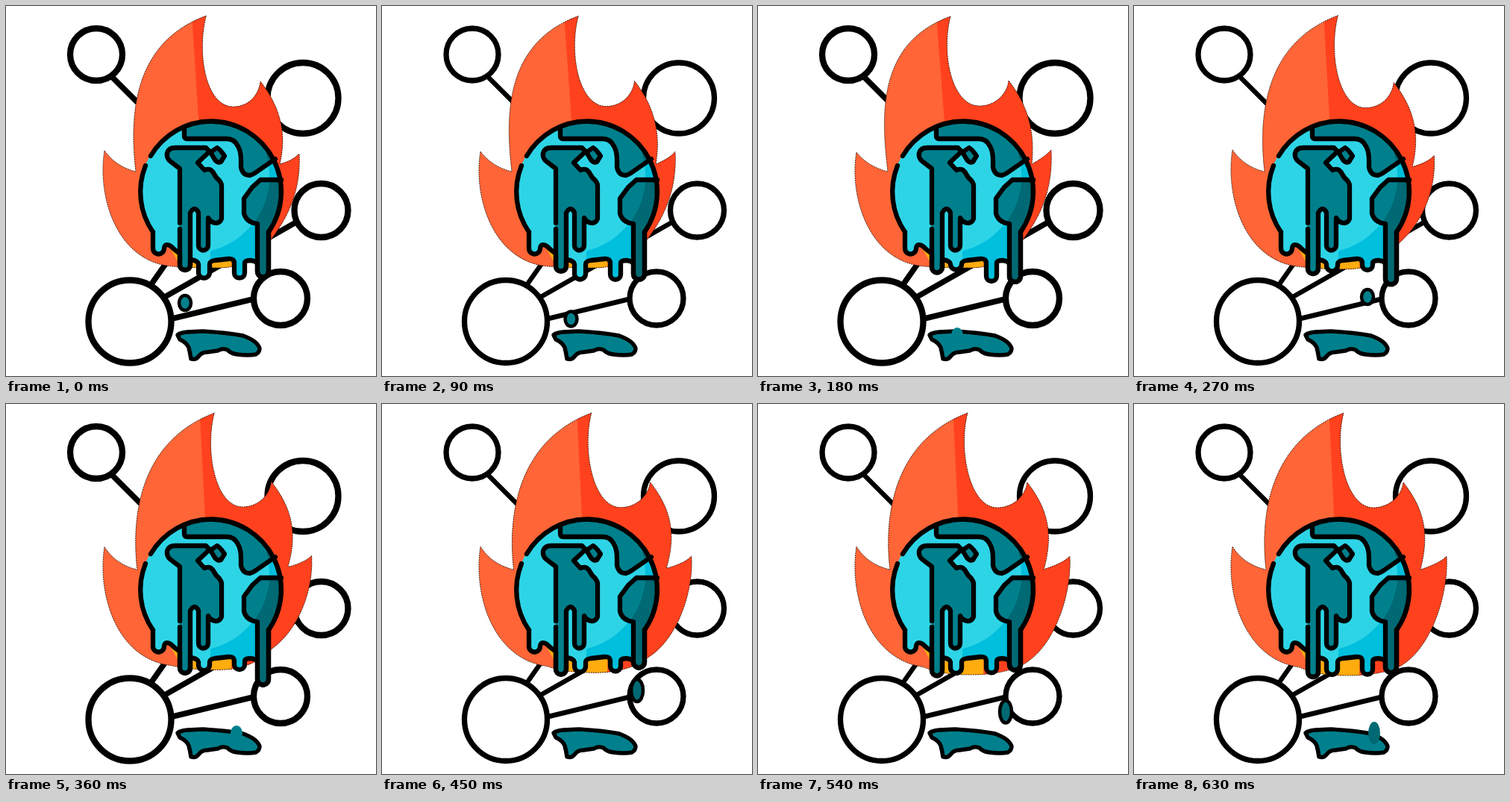
Recreate the animation shown at these times as an HTML page with a canvas. Size 496 by 496 pixels, loop 0.72 s.

```html
<!DOCTYPE html>
<html>
<head>
<meta charset="utf-8">
<title>Melting globe</title>
<style>
html, body { margin: 0; width: 100%; height: 100%; overflow: hidden; background: #fff; }
canvas { display: block; width: 100vw; height: 100vh; }
</style>
</head>
<body>
<canvas id="stage" width="496" height="496"></canvas>
<script>
const ctx = document.getElementById('stage').getContext('2d');
const STEP = 90, COUNT = 8;
const TEAL = '#00808c', DARK_TEAL = '#006973', CYAN = '#2dd4e6', DARK_CYAN = '#00bfdc';

const nodes = [[121, 65, 35], [398, 123.5, 47.5], [422.5, 274, 36], [368, 392, 36], [166, 423, 55.5]];
const links = 'M122 75L200 153M166 414L225 330M190 403L422 271M190 427L360 386';
const puddle = 'M230 441Q233 438 243 437L264 436Q298 438 318 442Q337 449 340 459Q340 464 335 467' +
  'Q325 469 310 467Q301 466 297 461Q290 458 284 462L270 464Q262 464 258 470Q254 475 248 473' +
  'Q247 466 245 458Q242 451 233 447Z';
const north = 'M239 163V174Q239 178 243 178H296Q306 178 311 188Q315 195 315 207V216' +
  'Q317 227 327 227Q331 226 335 223L361 205';
const lozenge = 'M274 196L283 190Q287 192 293 201L288 209Q284 211 280 206Z';
const rim = 'M194 201A94.5 94.5 0 0 1 275 154.5A94.5 94.5 0 0 1 352 303' +
  'M197 303A94.5 94.5 0 0 1 187 214';

// Each long drip lets go at a step, then grows back
const drips = [
  { from: 0, grow: 12 }, { from: 2, grow: 13 }, { from: 3, grow: 15 }, { from: 5, grow: 23 }
];
const drops = [
  { from: 0, steps: 3, x: 240, y: 398, endX: 267, ry: 10, color: TEAL },
  { from: 3, steps: 2, x: 313, y: 390, endX: 309, ry: 10, color: TEAL },
  { from: 5, steps: 3, x: 342, y: 384, endX: 322, ry: 15, color: DARK_TEAL }
];

const lerp = (a, b, t) => a + (b - a) * t;

// Settles back from rest to 0 in two steps, then eases out to 1
function lean(k, power, rest) {
  return k < 2 ? rest * (1 - k / 2) : 1 - (1 - (k - 2) / 5) ** power;
}

function fill(path, color) {
  ctx.fillStyle = color;
  ctx.fill(new Path2D(path));
}

function line(path, width = 6.3) {
  ctx.strokeStyle = '#000';
  ctx.lineWidth = width;
  ctx.stroke(new Path2D(path));
}

function drawNodes(big) {
  line(links, big ? 7.5 : 6.5);
  ctx.fillStyle = '#fff';
  ctx.lineWidth = big ? 8.3 : 7.3;
  for (const [x, y, r] of nodes) {
    ctx.beginPath();
    ctx.arc(x, y, r, 0, 7);
    ctx.fill();
    ctx.stroke();
  }
}

function drawFlame(k) {
  // The outer tips trail behind the top one
  const top = lean(k, 5, 0.45), mid = lean(k, 3, 0.2), side = lean(k, 2, 0), base = side * side;
  const tx = lerp(258, 281, top), ty = lerp(14, 12, top);
  const sx = lerp(336, 361, mid), sy = lerp(100, 105, mid);
  const rx = lerp(393, 419, side), ry = lerp(193, 204, top);
  const nx = lerp(367, 384, side), ny = lerp(212, 222, side);
  const ly = lerp(196, 191, top), mx = lerp(174, 177, side), my = 222;
  const bottom = lerp(351, 364, base), low = lerp(312, 352, base);
  const bx = (tx + sx) / 2, by = sy + 34;
  const path = new Path2D(
    `M${tx} ${ty}C${tx - 13} ${ty + 50} ${bx - 37} ${by} ${bx} ${by}` +
    `C${bx + 20} ${by} ${sx - 2} ${sy + 19} ${sx} ${sy}` +
    `C${sx + 29} ${sy + 37} ${sx + 35} 175 ${nx} ${ny}Q${rx - 8} ${ry + 9} ${rx} ${ry}` +
    `C${rx + 3} 250 ${rx - 18} ${low - 25} 356 ${low}Q330 ${bottom} 285 ${bottom}` +
    `Q245 ${bottom} 222 ${lerp(349, 353, base)}C148 342 122 255 132 ${ly}Q147 ${my - 7} ${mx} ${my}` +
    `C${mx - 8} ${my - 70} ${tx - 101} 50 ${tx} ${ty}Z`);
  ctx.fillStyle = '#ff6536';
  ctx.fill(path);
  ctx.save();
  ctx.clip(path);
  fill(`M${tx - 20} 0L${258 + (tx - 268) * 0.8} 155L270 400H496V0Z`, '#ff421d');
  fill('M220 324L232 346L245 372H302L303 320Z', '#ffac0f');
  ctx.restore();
  ctx.setLineDash([1, 2]);
  ctx.lineWidth = 0.8;
  ctx.stroke(path);
  ctx.setLineDash([]);
}

function drawGlobe(k) {
  const [a, b, c, d] = drips.map(({ from, grow }) => 357 + grow * ((k - from + COUNT) % COUNT) / 7);
  const edge = `V${d - 11}a7.5 7.5 0 0 1-15 0V346Q336 342 328 341Q320 341 320 345` +
    `V${c - 10}a7 7 0 0 1-14 0V345Q306 338 298 339L280 341Q273 342 273 346` +
    `V${b - 11}a7.5 7.5 0 0 1-15 0V346Q257 341 247 340` +
    `V${a - 10}a7 7 0 0 1-14 0V332Q226 327 221 322Q213 317 212 325a7.5 7.5 0 0 1-15 0V303`;
  const west = 'M233 291V218L220 208Q215 204 216 197Q218 190 227 190H268L273 195L257 210L266 220' +
    'Q273 217 277 222L282 230Q289 236 289 241V285Q287 291 281 291Q274 290 271 284' +
    `V321a6.5 6.5 0 0 1-13 0V277Q253 267 247 277V${a - 10}a7 7 0 0 1-14 0V299`;
  const east = `M369 233H341L330 243L319 258V278Q322 290 337 292V${d - 11}a7.5 7.5 0 0 0 15 0V303`;

  function paint(sea, land) {
    ctx.fillStyle = sea;
    ctx.fillRect(170, 140, 210, 260);
    for (const path of [west, lozenge, east + 'L380 260V233Z', north + 'L380 140H239Z']) fill(path, land);
  }

  ctx.save();
  ctx.clip(new Path2D('M197 303A94.5 94.5 0 1 1 352 303' + edge + 'Z'));
  paint(CYAN, TEAL);
  // Shaded crescent on the right
  ctx.beginPath();
  ctx.rect(274, 100, 120, 300);
  ctx.clip();
  ctx.beginPath();
  ctx.rect(100, 50, 300, 350);
  ctx.arc(250, 228, 103, 0, 7);
  ctx.clip('evenodd');
  paint(DARK_CYAN, DARK_TEAL);
  ctx.restore();

  for (const path of [west, east, north, lozenge, rim, 'M352 303' + edge]) line(path);
}

function drawDrop(k) {
  const { from, steps, x, y, endX, ry, color } = drops.findLast(drop => drop.from <= k);
  const fall = (k - from) / (steps - 1);
  ctx.beginPath();
  ctx.ellipse(lerp(x, endX, fall), lerp(y, 441, fall), 8, ry, 0, 0, 7);
  ctx.fillStyle = color;
  ctx.fill();
  ctx.lineWidth = 4.5;
  if (fall < 1) ctx.stroke();
}

function draw() {
  const k = Math.floor(performance.now() / STEP) % COUNT;
  ctx.fillStyle = '#fff';
  ctx.fillRect(0, 0, 496, 496);
  ctx.lineCap = ctx.lineJoin = 'round';
  drawNodes(k < 6 && k % 2 === 0);
  drawFlame(k);
  drawGlobe(k);
  fill(puddle, TEAL);
  line(puddle, 5.5);
  drawDrop(k);
  requestAnimationFrame(draw);
}

draw();
</script>
</body>
</html>
```
